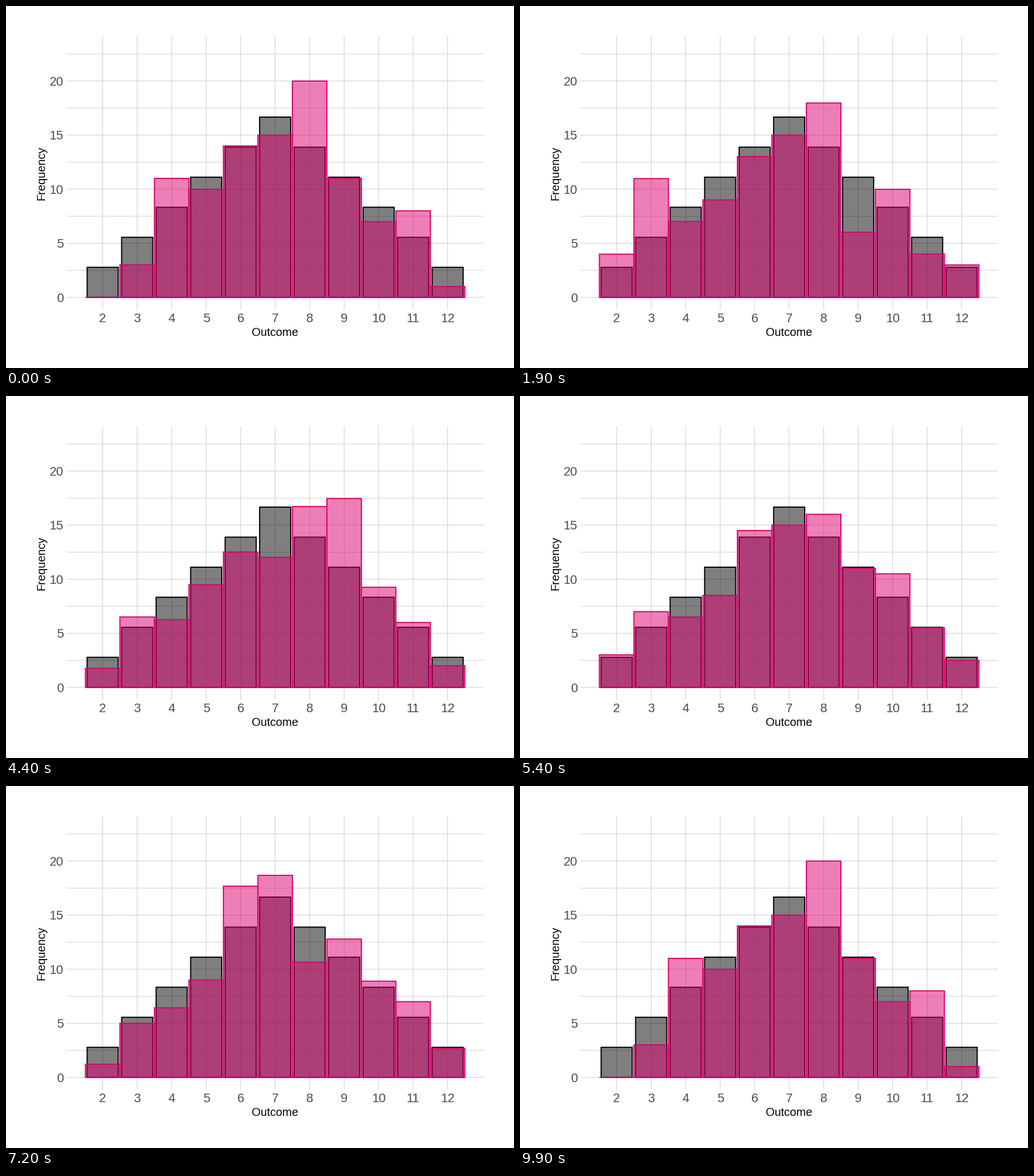
A matplotlib script that plays this animation: 885 by 632 pixels, repeating every 10 s.

```python
import matplotlib.pyplot as plt
import numpy as np
from matplotlib.animation import FuncAnimation
from matplotlib.patches import Rectangle

W, H, DPI = 885, 632, 100
FRAMES, STEPS = 100, 10
PX = 72 / DPI  # points per pixel

X2, DX = 168.4, 60.1    # position of outcome 2, width of one outcome
Y0, DY = 508.7, 18.885  # baseline, height of one count
LEFT, RIGHT, TOP, BOTTOM = 105.3, 832.4, 52.6, 530.3
PINK = "#de006f"
OUTCOMES = np.arange(2, 13)

# Counts per outcome in ten samples of 100 throws of two dice
SAMPLES = np.array([
    [0, 3, 11, 10, 14, 15, 20, 11, 7, 8, 1],
    [2, 6, 9, 12, 17, 16, 10, 13, 8, 5, 2],
    [4, 11, 7, 9, 13, 15, 18, 6, 10, 4, 3],
    [3, 4, 8, 9, 12, 23, 13, 13, 7, 6, 2],
    [1, 6, 6, 10, 12, 11, 18, 19, 9, 6, 2],
    [4, 8, 7, 8, 14, 15, 13, 13, 10, 6, 2],
    [2, 6, 6, 9, 15, 15, 19, 9, 11, 5, 3],
    [1, 5, 6, 9, 18, 19, 10, 13, 9, 7, 3],
    [3, 5, 10, 9, 15, 16, 16, 11, 8, 7, 0],
    [4, 4, 9, 11, 11, 16, 19, 13, 4, 5, 4],
])

plt.rcParams["font.family"] = "Liberation Sans"
fig = plt.figure(figsize=(W / DPI, H / DPI), dpi=DPI, facecolor="white")
ax = fig.add_axes([0, 0, 1, 1])
ax.set_xlim(0, W)
ax.set_ylim(H, 0)
ax.axis("off")


def x_at(outcome):
    return X2 + (outcome - 2) * DX


def y_at(count):
    return Y0 - count * DY


def grid_line(xs, ys, width):
    ax.plot(xs, ys, color="#cccccc", lw=width * PX, snap=False, zorder=1,
            solid_capstyle="butt")


def label(x, y, text, size, color="black", **kw):
    ax.text(x, y, text, fontsize=size * PX, color=color, va="baseline", **kw)


def bar(outcome, count, width, color, z):
    rect = Rectangle((x_at(outcome - width / 2), y_at(count)),
                     width * DX, count * DY, lw=2 * PX, ec=color,
                     fc=(color, 0.5), snap=False, zorder=z)
    return ax.add_patch(rect)


def cubic_in_out(t):
    return 4 * t**3 if t < 0.5 else 1 - 4 * (1 - t)**3


for n in np.arange(0, 23, 2.5):
    major = n % 5 == 0
    grid_line([LEFT, RIGHT], [y_at(n)] * 2, 1.0 if major else 0.9)
    if major:
        label(100, y_at(n) + 7.9, f"{n:.0f}", 22, "#4d4d4d", ha="right")

for k in OUTCOMES:
    grid_line([x_at(k)] * 2, [TOP, BOTTOM], 1.0)
    label(x_at(k), 551.5, str(k), 22, "#4d4d4d", ha="center")

label(x_at(7), 575.5, "Outcome", 20, ha="center")
ax.text(67.5, 291.5, "Frequency", fontsize=20 * PX, rotation=90,
        rotation_mode="anchor", ha="center", va="baseline")

for k in OUTCOMES:
    bar(k, 100 * (6 - abs(k - 7)) / 36, 0.9, "black", 2)
bars = [bar(k, n, 1, PINK, 3) for k, n in zip(OUTCOMES, SAMPLES[0])]


def update(frame):
    # 101 tween positions spread over 100 frames: the middle one is skipped
    pos = frame + (frame >= FRAMES // 2)
    i, step = divmod(pos, STEPS)
    a = SAMPLES[i % len(SAMPLES)]
    b = SAMPLES[(i + 1) % len(SAMPLES)]
    counts = a + (b - a) * cubic_in_out(step / STEPS)
    for rect, n in zip(bars, counts):
        rect.set_y(y_at(n))
        rect.set_height(n * DY)
    return bars


anim = FuncAnimation(fig, update, frames=FRAMES, interval=100, repeat=True,
                     repeat_delay=0, blit=False)
plt.show()
```
